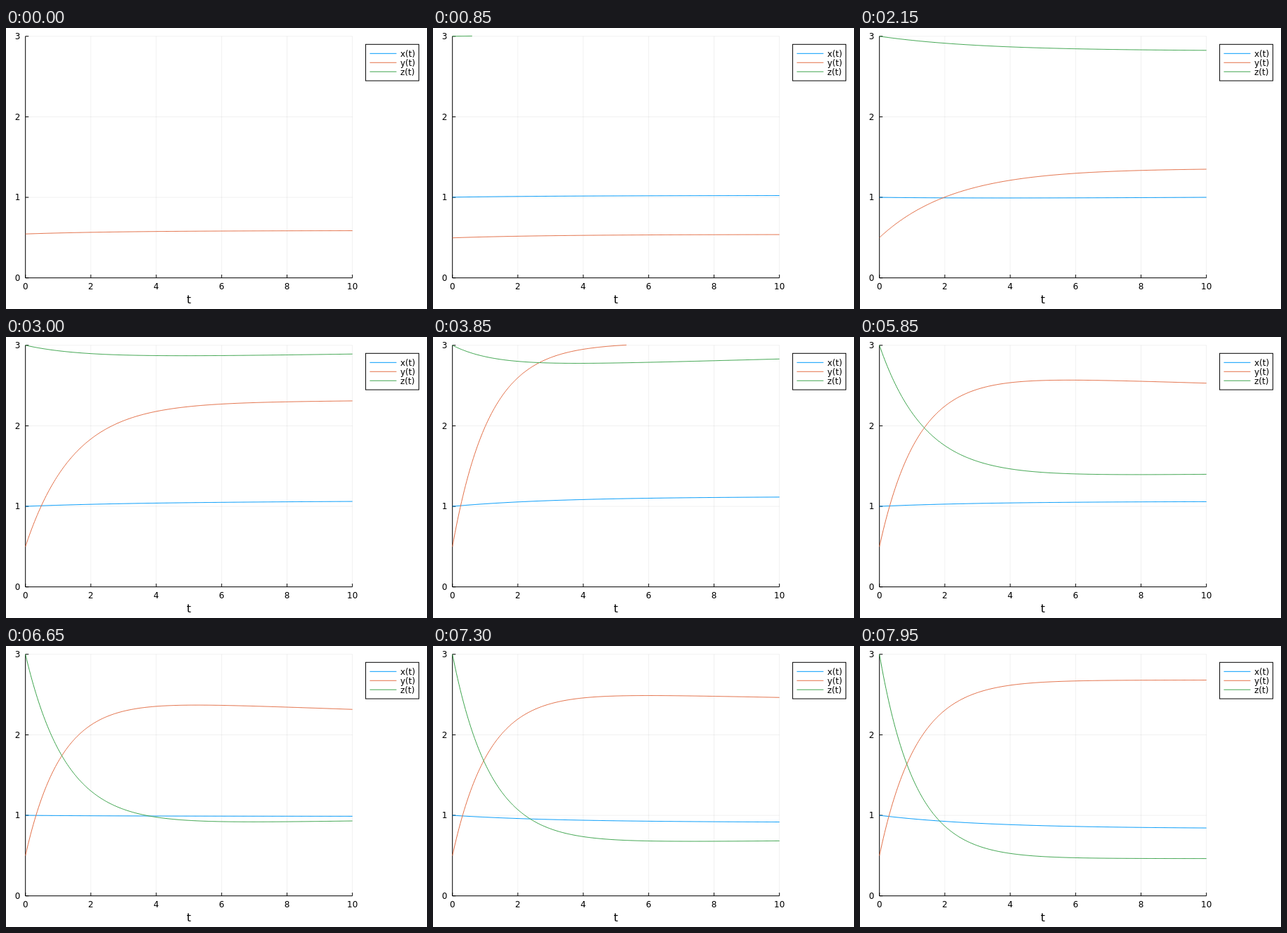
These frames come from a looping animation (600x400 px, 8 s). An HTML page with a canvas:

```html
<!DOCTYPE html>
<html lang="en">
<head>
<meta charset="utf-8">
<title>Fitted curves</title>
<style>
html, body { margin: 0; width: 100%; height: 100%; overflow: hidden; background: #fff; }
canvas { display: block; }
</style>
</head>
<body>
<canvas id="plot" width="600" height="400"></canvas>
<script>
const ctx = document.getElementById('plot').getContext('2d');
const LOOP = 8000, STEP = 50;
const X = t => 27.7 + 46.6 * t;
const Y = v => 355.7 - 114.63 * v;

// Every curve is start + rise * (1 - exp(-rate * t)) + drift * t.
// The fit moves smoothly through these key poses of [rise, rate, drift].
const KEYS = [
  { at: 850, x: [.021, .3, 0], y: [.042, .33, 0], z: [.035, .15, 0] },
  { at: 2150, x: [-.025, .3, .0024], y: [.86, .44, 0], z: [-.182, .32, 0] },
  { at: 3850, x: [.121, .3, 0], y: [2.503, .9, .004], z: [-.28, .78, .011] },
  { at: 5850, x: [.061, .3, 0], y: [2.155, .86, -.0125], z: [-1.643, .72, .004] },
  { at: 6650, x: [-.012, .3, 0], y: [1.961, .92, -.0145], z: [-2.13, .81, .006] },
  { at: 7950, x: [-.165, .3, 0], y: [2.18, .88, 0], z: [-2.537, .92, 0] }
];

// Start values settle from their first guess; y swings past its goal once.
const decay = time => Math.exp(-time / 120);
const swing = time => .1 * Math.exp(-time / 250) * Math.cos(1.1 + Math.PI * time / 300);
const SERIES = [
  { name: 'x', color: '#009afa', start: time => 1 + 2.4 * decay(time) },
  { name: 'y', color: '#e36f47', start: time => .5 + swing(time) },
  { name: 'z', color: '#3da44d', start: time => 3 + .5 * decay(time) }
];

// Cubic Hermite interpolation with central-difference slopes.
function poseAt(name, time) {
  const last = KEYS.length - 1;
  const t = Math.min(Math.max(time, KEYS[0].at), KEYS[last].at);
  const k = Math.max(KEYS.findIndex(key => key.at >= t) - 1, 0);
  const from = KEYS[k], to = KEYS[k + 1], span = to.at - from.at;
  const u = (t - from.at) / span;
  return from[name].map((a, i) => {
    const slope = j => {
      const before = KEYS[Math.max(j - 1, 0)], after = KEYS[Math.min(j + 1, last)];
      return (after[name][i] - before[name][i]) / (after.at - before.at) * span;
    };
    return a + (to[name][i] - a) * u * u * (3 - 2 * u)
      + slope(k) * u * (1 - u) ** 2 - slope(k + 1) * u * u * (1 - u);
  });
}

function line(x1, y1, x2, y2, color, width = 1) {
  ctx.strokeStyle = color;
  ctx.lineWidth = width;
  ctx.beginPath();
  ctx.moveTo(x1, y1);
  ctx.lineTo(x2, y2);
  ctx.stroke();
}

function label(text, x, y, align, size = 12) {
  ctx.fillStyle = '#000';
  ctx.font = `${size}px "DejaVu Sans", sans-serif`;
  ctx.textAlign = align;
  ctx.fillText(text, x, y);
}

function drawAxes() {
  const grid = 'rgba(0,0,0,.1)', top = Y(3), base = Y(0), left = X(0), right = X(10);
  for (let t = 0; t <= 10; t += 2) {
    line(X(t), base, X(t), top, grid, .6);
    line(X(t), base, X(t), base - 4.6, '#000');
    label(t, X(t), 371.7, 'center');
  }
  for (let v = 0; v <= 3; v++) {
    line(left, Y(v), right, Y(v), grid, .6);
    line(left, Y(v), left + 4.6, Y(v), '#000');
    label(v, 20.3, Y(v) + 4.4, 'right');
  }
  line(left, base, right, base, '#000');
  line(left, base, left, top, '#000');
  label('t', 260.7, 392.3, 'center', 16);
}

function drawLegend() {
  ctx.strokeStyle = '#000';
  ctx.lineWidth = 1;
  ctx.strokeRect(512.6, 23.3, 75.8, 51.8);
  SERIES.forEach(({ name, color }, i) => {
    const y = 36.3 + 12.95 * i;
    line(518.5, y, 556.5, y, color);
    label(`${name}(t)`, 562, y + 4.3, 'left');
  });
}

function drawCurve({ name, color, start }, time) {
  const [rise, rate, drift] = poseAt(name, time);
  const origin = start(time);
  ctx.strokeStyle = color;
  ctx.lineWidth = 1;
  ctx.beginPath();
  let penDown = false;
  for (let i = 0; i <= 250; i++) {
    const t = i / 25;
    const v = origin + rise * (1 - Math.exp(-rate * t)) + drift * t;
    const visible = v <= 3.0035;
    if (visible) ctx[penDown ? 'lineTo' : 'moveTo'](X(t), Y(v));
    penDown = visible;
  }
  ctx.stroke();
}

function render(now) {
  const time = Math.floor(now % LOOP / STEP) * STEP;
  ctx.fillStyle = '#fff';
  ctx.fillRect(0, 0, 600, 400);
  drawAxes();
  SERIES.forEach(series => drawCurve(series, time));
  drawLegend();
}

const begin = performance.now();
function tick() {
  render(performance.now() - begin);
  requestAnimationFrame(tick);
}
tick();
</script>
</body>
</html>
```
